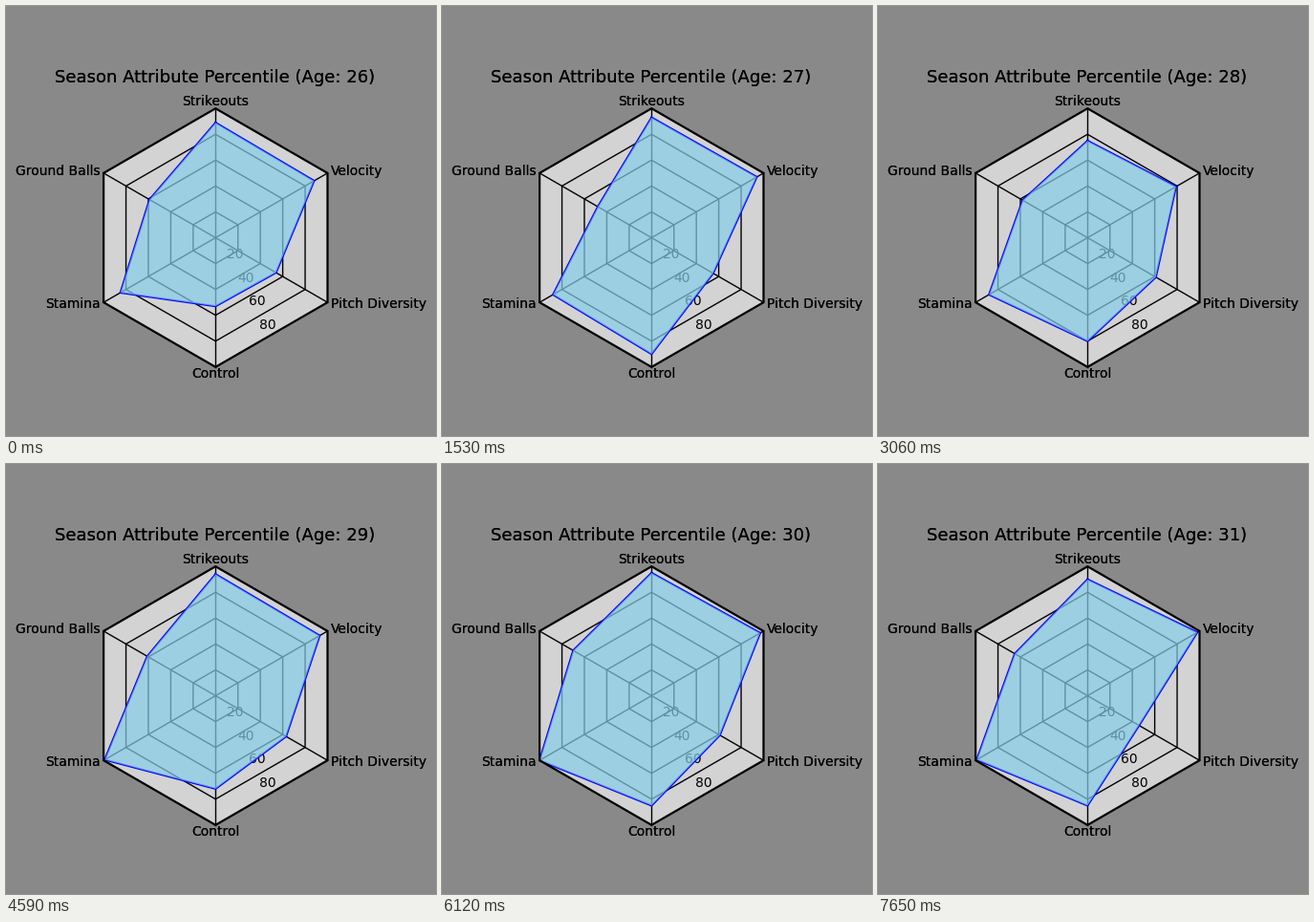
Write a matplotlib script that moves like this. It is 450 px wide and 450 px high and loops after 9180 ms.

```python
import numpy as np
import matplotlib.pyplot as plt
from matplotlib.animation import FuncAnimation

plt.rcParams["font.family"] = "DejaVu Sans"

SIZE, DPI = 450, 100
CX, CY, RADIUS = 219.3, 242.5, 135.3
AGES = range(26, 32)

# Percentile at each age, attributes clockwise from the top
SCORES = {
    "Strikeouts": (89, 93, 75, 94, 95, 90),
    "Velocity": (88, 94, 79, 93, 97, 98),
    "Pitch Diversity": (54, 55, 61, 63, 61, 46),
    "Control": (53, 90, 80, 72, 85, 85),
    "Stamina": (85, 88, 88, 99, 100, 99),
    "Ground Balls": (59, 48, 58, 61, 70, 65),
}
ANGLES = np.arange(len(SCORES)) * 2 * np.pi / len(SCORES)


def corners(values):
    """Pixel positions of one value per axis."""
    r = np.asarray(values) * RADIUS / 100
    return np.column_stack([CX + r * np.sin(ANGLES), CY - r * np.cos(ANGLES)])


def polygon(level, **style):
    points = corners(np.full(len(SCORES), level))
    return ax.add_patch(plt.Polygon(points, closed=True, **style))


def heavy_text(x, y, text, **style):
    """Text laid down twice, which darkens its soft edges."""
    return [ax.text(x, y, text, va="baseline", zorder=5, **style)
            for _ in range(2)]


fig = plt.figure(figsize=(SIZE / DPI, SIZE / DPI), dpi=DPI, facecolor="#898989")
ax = fig.add_axes([0, 0, 1, 1])
ax.set(xlim=(0, SIZE), ylim=(SIZE, 0))
ax.axis("off")

# Grid and its scale
polygon(100, facecolor="lightgray", edgecolor="none", zorder=0)
for x, y in corners(np.full(len(SCORES), 100)):
    ax.plot([CX, x], [CY, y], color="black", lw=1, zorder=1)
for k, level in enumerate((20, 40, 60, 80)):
    polygon(level, fill=False, edgecolor="black", lw=1, zorder=1)
    ax.text(239.7 + 11.35 * k, 263.9 + 24.67 * k, str(level),
            size=10, ha="center", va="baseline", zorder=1)

# The translucent area covers the inner half of the outline
outline, = ax.plot([], [], color="blue", lw=1.5, zorder=2)
area = polygon(0, facecolor="skyblue", edgecolor="none", alpha=0.7, zorder=3)
polygon(100, fill=False, edgecolor="black", lw=1.6, zorder=4)

for name, angle in zip(SCORES, ANGLES):
    sin, cos = round(np.sin(angle), 3), np.cos(angle)
    align = {0: "center", 1: "left", -1: "right"}[int(np.sign(sin))]
    heavy_text(CX + (RADIUS + 3.9) * sin,
               CY + 4 - RADIUS * cos - 7.2 * cos * abs(cos),
               name, size=10, ha=align)
titles = heavy_text(218.8, 80, "", size=13, ha="center")


def update(i):
    points = corners([scores[i] for scores in SCORES.values()])
    area.set_xy(points)
    outline.set_data(*np.vstack([points, points[:1]]).T)
    for title in titles:
        title.set_text(f"Season Attribute Percentile (Age: {AGES[i]})")
    return area, outline, *titles


anim = FuncAnimation(fig, update, frames=len(AGES), interval=1530,
                     repeat=True, repeat_delay=0)
plt.show()
```
